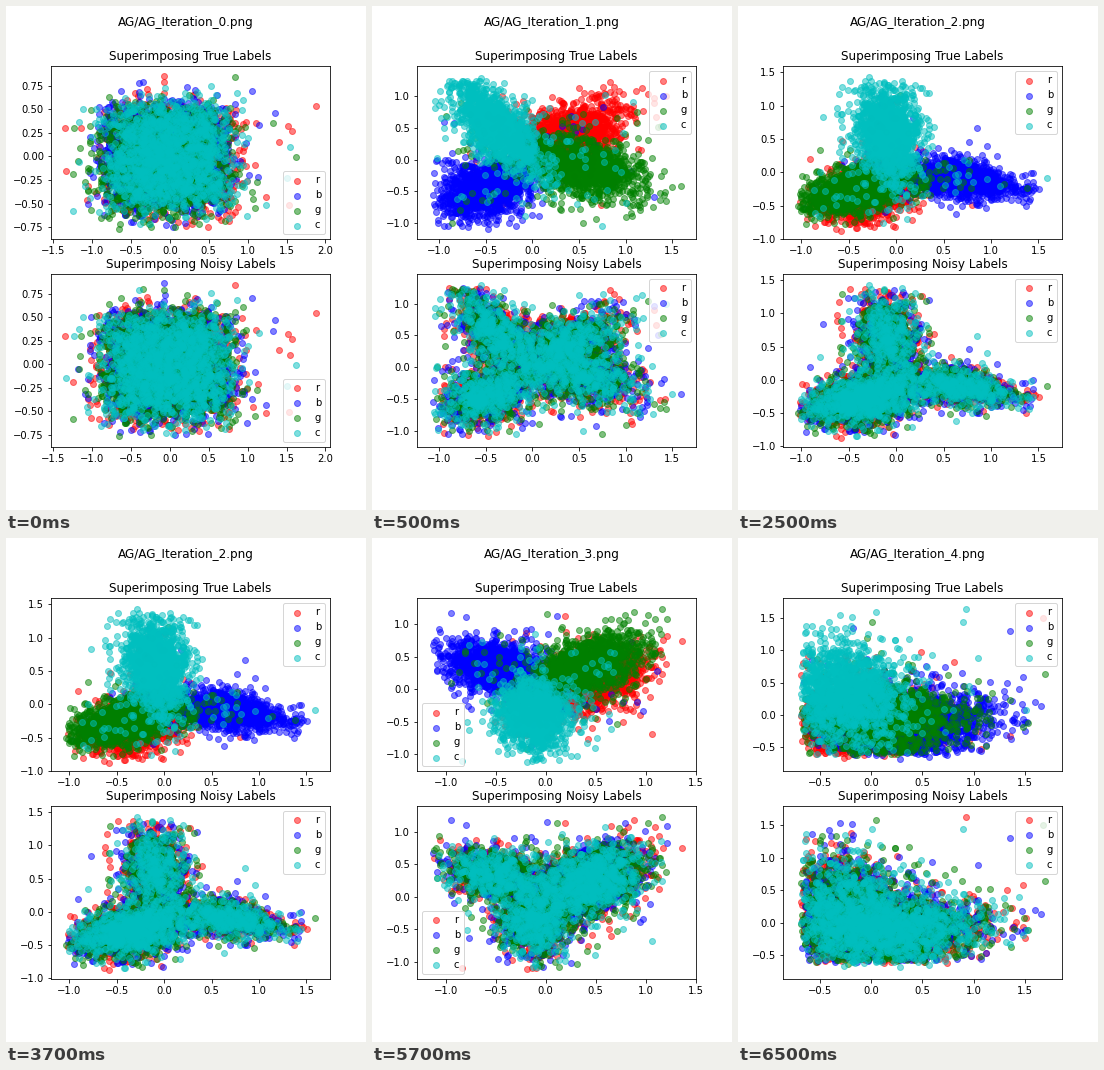
Animation of 360x504 px, one loop 8000 ms. Source, as a matplotlib script:

```python
import numpy as np
import matplotlib.pyplot as plt
from matplotlib.animation import FuncAnimation
from matplotlib.ticker import MultipleLocator

plt.rcParams.update({"font.family": "DejaVu Sans", "font.size": 10})

COLORS = "rbgc"
PER_CLASS = 1500
STEP_MS = 500
STARTS = [0, 1, 5, 9, 13]  # first step of each iteration
TOTAL_STEPS = 16

# x low, x high, y low, y high
LIMITS = [
    (-1.527, 2.058, -0.882, 0.957),
    (-1.238, 1.755, -1.257, 1.466),
    (-1.195, 1.748, -1.008, 1.588),
    (-1.285, 1.501, -1.267, 1.392),
    (-0.860, 1.860, -0.871, 1.800),
]
LEGEND_SPOTS = ["lower right", "upper right", "upper right", "lower left", "upper right"]

# Per class: centre x, centre y, spread along, spread across, tilt in degrees
CLUSTERS = {
    1: [(0.38, 0.38, 0.30, 0.17, 40), (-0.50, -0.45, 0.24, 0.17, 38),
        (0.52, -0.10, 0.34, 0.18, -25), (-0.38, 0.52, 0.36, 0.14, 118)],
    2: [(-0.30, -0.33, 0.24, 0.15, 22), (0.66, -0.10, 0.30, 0.12, -12),
        (-0.42, -0.27, 0.27, 0.14, 22), (-0.09, 0.60, 0.31, 0.15, 94)],
    3: [(0.42, 0.10, 0.30, 0.17, 35), (-0.50, 0.34, 0.25, 0.16, -28),
        (0.42, 0.38, 0.28, 0.17, 38), (-0.12, -0.40, 0.25, 0.16, 100)],
    4: [(-0.15, -0.10, 0.28, 0.25, 0), (0.45, -0.15, 0.35, 0.22, 12),
        (0.14, -0.04, 0.32, 0.22, 0), (-0.24, 0.38, 0.34, 0.25, 100)],
}
DRIFT = [(0.07, 0.0), (-0.04, 0.02), (-0.04, -0.03), (0.02, 0.02)]

# Far points: x, y, true class + noisy class
OUTLIERS = [
    [(-1.35, 0.30, "rr"), (-1.33, -0.15, "rc"), (-1.23, 0.30, "gc"), (1.88, 0.54, "rr"),
     (1.52, 0.32, "rr"), (1.57, 0.27, "rr"), (1.40, 0.15, "rr"), (0.84, 0.84, "gr"),
     (1.05, 0.70, "bb"), (-0.07, 0.86, "rb"), (1.50, -0.23, "cc"), (1.10, -0.55, "gg")],
    [(-1.06, -0.21, "bb"), (1.59, -0.42, "gb"), (1.28, 0.02, "gc"), (1.37, -0.64, "gg"),
     (0.88, 1.15, "rr"), (-0.55, 1.29, "cc"), (1.05, 0.72, "rr"), (-1.07, -0.55, "bb")],
    [(-1.04, -0.50, "gg"), (1.59, -0.09, "cg"), (-0.29, 1.43, "cc"), (0.85, 0.66, "bc"),
     (-0.58, -0.88, "rr"), (1.33, -0.05, "bb"), (0.77, 0.46, "bb")],
    [(-0.95, 1.17, "bb"), (1.36, 0.74, "rr"), (1.16, 1.23, "gg"), (0.88, 1.18, "gr"),
     (-1.13, 0.67, "bb"), (-0.80, 1.10, "bb"), (0.73, 1.06, "gg"), (-0.19, -1.12, "cr")],
    [(1.67, 1.50, "rg"), (0.92, 1.63, "cr"), (0.05, 1.59, "cg"), (1.69, 0.64, "gg"),
     (1.60, 0.20, "bb"), (1.35, 1.30, "bb"), (1.66, 0.14, "bb"), (0.89, 1.44, "cc")],
]


def blob(rng, cx, cy, along, across, tilt):
    u, v = rng.standard_t(9, (2, PER_CLASS)) * [[along], [across]]
    a = np.radians(tilt)
    return np.column_stack([cx + u * np.cos(a) - v * np.sin(a),
                            cy + u * np.sin(a) + v * np.cos(a)])


def rounded_box(rng, dx, dy):
    flat = rng.uniform(-1, 1, (PER_CLASS, 2)) * (0.62, 0.44)
    return flat + rng.standard_t(6, (PER_CLASS, 2)) * (0.17, 0.12) + (dx - 0.04, dy - 0.02)


def make_points(k):
    """Return the positions with their true and noisy classes."""
    rng = np.random.default_rng(40 + k)
    if k == 0:
        groups = [rounded_box(rng, *d) for d in DRIFT]
    else:
        groups = [blob(rng, *c) for c in CLUSTERS[k]]
    points = np.concatenate(groups)
    true = np.repeat(np.arange(4), PER_CLASS)
    stray = rng.random(len(true)) < 0.03
    true[stray] = rng.integers(0, 4, stray.sum())
    if k == 4:  # the cloud has firm left and lower edges
        floor = np.array([-0.66, -0.60]) + rng.normal(0, 0.03, points.shape)
        points = floor + np.abs(points - floor)

    x0, x1, y0, y1 = LIMITS[k]
    unit = (points - (x0, y0)) / (x1 - x0, y1 - y0)
    inside = ((unit > 0.06) & (unit < 0.92)).all(axis=1)
    points, true = points[inside], true[inside]
    noisy = rng.integers(0, 4, len(points))

    far = OUTLIERS[k]
    points = np.concatenate([points, [p[:2] for p in far]])
    true = np.append(true, [COLORS.index(p[2][0]) for p in far])
    noisy = np.append(noisy, [COLORS.index(p[2][1]) for p in far])
    return points, true, noisy


def draw_panel(ax, k, title, points, labels):
    for i, color in enumerate(COLORS):
        x, y = points[labels == i].T
        ax.scatter(x, y, c=color, alpha=0.5, label=color)
    x0, x1, y0, y1 = LIMITS[k]
    ax.set(xlim=(x0, x1), ylim=(y0, y1), title=title)
    ax.xaxis.set_major_locator(MultipleLocator(0.5))
    ax.yaxis.set_major_locator(MultipleLocator(0.25 if k == 0 else 0.5))
    ax.legend(loc=LEGEND_SPOTS[k])


fig = plt.figure(figsize=(5, 7), dpi=72, facecolor="white")
CLOUDS = [make_points(k) for k in range(5)]
shown = None


def update(step):
    global shown
    k = int(np.searchsorted(STARTS, step, side="right")) - 1
    if k == shown:
        return
    shown = k
    fig.clear()
    top, bottom = fig.subplots(2, 1)
    fig.subplots_adjust(left=0.125, right=0.9, bottom=0.125, top=0.88, hspace=0.2)
    fig.suptitle(f"AG/AG_Iteration_{k}.png", fontsize=12)
    points, true, noisy = CLOUDS[k]
    draw_panel(top, k, "Superimposing True Labels", points, true)
    draw_panel(bottom, k, "Superimposing Noisy Labels", points, noisy)


anim = FuncAnimation(fig, update, frames=TOTAL_STEPS, interval=STEP_MS,
                     init_func=lambda: update(0), repeat=True, repeat_delay=0)
plt.show()
```
